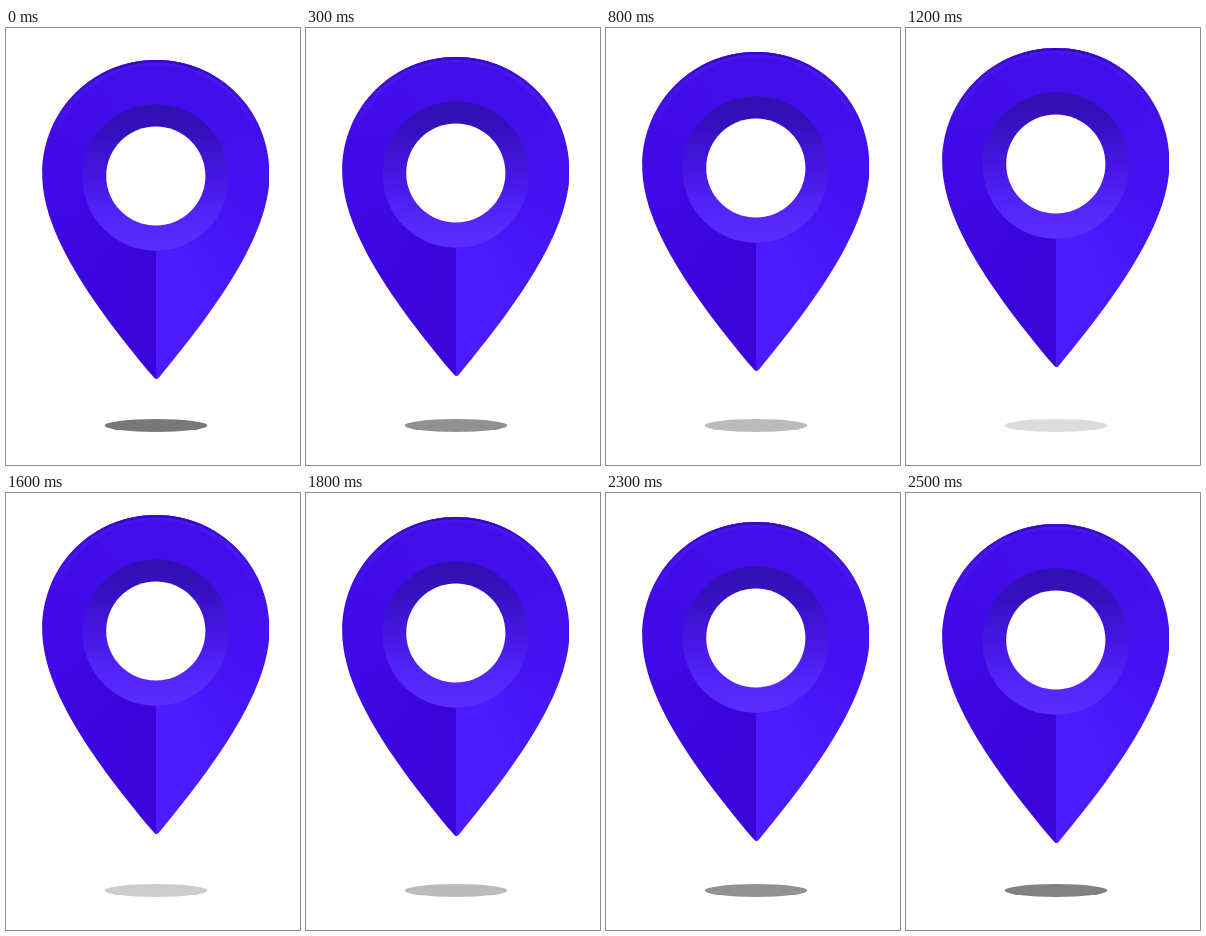
An HTML page that plays this animation: 294 px wide and 437 px high, repeating every 2.6 s.

```html
<!DOCTYPE html>
<html lang="en">
<head>
<meta charset="utf-8">
<title>Floating map pin</title>
<style>
  html, body { margin: 0; width: 100%; height: 100%; overflow: hidden; background: #fff; }
  .stage { position: relative; width: 294px; height: 437px; overflow: hidden; }
  svg { position: absolute; left: 0; top: 0; display: block; }

  .pin { position: absolute; inset: 0; animation: hover 2.6s steps(13) infinite; }
  .body {
    position: absolute; left: 0; top: 0; width: 263px; height: 437px;
    background: conic-gradient(from 180deg at 150px 148px,
      #3a04da 0deg, #3c05df 30deg, #4009e6 75deg, #420dea 150deg,
      #410eea 200deg, #430fed 250deg, #4613f5 300deg, #4b1aff 335deg, #4c1bff 360deg);
    clip-path: path("M150 32C213 32 263.6 82 263.6 146C263.6 198 226 262 153 349.6Q150.5 352.6 148 349.6C74 262 36.2 198 36.2 146C36.2 82 87 32 150 32Z");
  }
  .shadow { animation: fade 2.6s steps(13) infinite; }

  @keyframes hover {
    0%, 100% { transform: translateY(0); }
    50% { transform: translateY(-13px); }
  }
  @keyframes fade {
    0%, 100% { opacity: .53; }
    50% { opacity: .105; }
  }
</style>
</head>
<body>
<div class="stage">
  <svg width="294" height="437">
    <ellipse class="shadow" cx="150" cy="397.5" rx="51.2" ry="6.5"/>
  </svg>
  <div class="pin">
    <div class="body">
      <svg width="263" height="437">
        <defs>
          <linearGradient id="rim" gradientUnits="userSpaceOnUse" x1="0" y1="32" x2="0" y2="112">
            <stop offset="0" stop-color="#3508c8"/>
            <stop offset="1" stop-color="#3508c8" stop-opacity="0"/>
          </linearGradient>
          <linearGradient id="gloss" gradientUnits="userSpaceOnUse" x1="0" y1="36" x2="0" y2="108">
            <stop offset="0" stop-color="#5a30f2" stop-opacity=".6"/>
            <stop offset="1" stop-color="#5a30f2" stop-opacity="0"/>
          </linearGradient>
          <filter id="soft" x="-20%" y="-20%" width="140%" height="140%">
            <feGaussianBlur stdDeviation="2.5"/>
          </filter>
        </defs>
        <path d="M45 120A106 104 0 0 1 255 120" fill="none" stroke="url(#gloss)" stroke-width="9" filter="url(#soft)"/>
        <path d="M36 146C36 82 87 32 150 32C213 32 264 82 264 146" fill="none" stroke="url(#rim)" stroke-width="5"/>
      </svg>
    </div>
    <svg width="294" height="437">
      <defs>
        <linearGradient id="ring" x1="0" y1="0" x2="0" y2="1">
          <stop offset="0" stop-color="#3110b0"/>
          <stop offset=".18" stop-color="#3510bd"/>
          <stop offset=".5" stop-color="#4616e4"/>
          <stop offset=".78" stop-color="#5425fb"/>
          <stop offset="1" stop-color="#5a2eff"/>
        </linearGradient>
      </defs>
      <circle cx="149.8" cy="149.5" r="73.2" fill="url(#ring)"/>
      <circle cx="149.8" cy="148" r="49.6" fill="#fff"/>
    </svg>
  </div>
</div>
</body>
</html>
```
